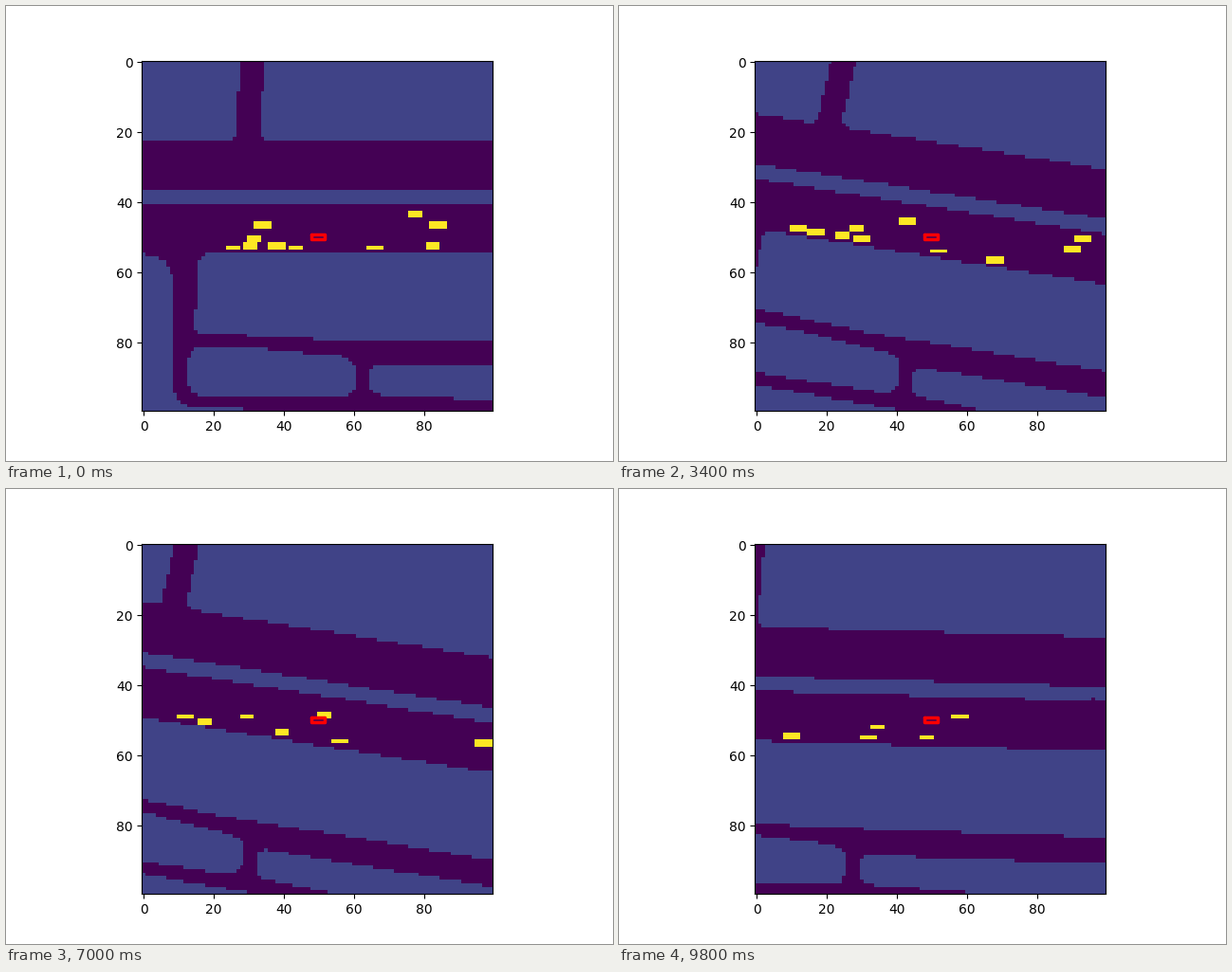
Animation of 640 by 480 pixels, one loop 9900 ms. Source, as a matplotlib script:

```python
import numpy as np
import matplotlib.pyplot as plt
from matplotlib.animation import FuncAnimation
from matplotlib.path import Path

N = 100
MID = N // 2
STEPS = 50
ROAD, LAND, CAR = 0, 1, 5
FAR = 140

# Main road edges and its median strip, as heights relative to the start
ROAD_TOP, MEDIAN_TOP, MEDIAN_LOW, ROAD_LOW = -27.5, -13.4, -9.2, 4.95

HALF_L, HALF_W = 1.8, .3
REAR_LIMIT = -41.7

# Start x, speed, acceleration, lane y
CARS = [
    # parked along the kerb
    (-24.5, 0, 0, 3.1), (-19.5, 0, 0, 2.79), (-11.8, 0, 0, 2.79),
    (-6.4, 0, 0, 3.15), (16, 0, 0, 3.15), (32.4, 0, 0, 2.79),
    # driving
    (27.5, 1.78, -.005, -6.8),
    (34, 1.16, -.0014, -3.3),
    (-16, 1.36, -.0037, -3.75),
    (-18.5, .52, .0047, .2),
]


def rounded(corners, r):
    """Closed path whose corners are replaced by quadratic curves."""
    p = np.array(corners, float)
    t = np.linspace(0, 1, 7)[:, None]
    out = []
    for prev, c, nxt in zip(np.roll(p, 1, 0), p, np.roll(p, -1, 0)):
        a, b = (c + (q - c) * min(.5, r / np.hypot(*(q - c)))
                for q in (prev, nxt))
        out.append((1 - t)**2 * a + 2 * t * (1 - t) * c + t**2 * b)
    return Path(np.vstack(out))


# Land between the streets; everything else is road
BLOCKS = [
    rounded([(-FAR, -90), (-20, -90), (-23.9, ROAD_TOP), (-FAR, ROAD_TOP)], 2),
    rounded([(-13, -90), (FAR, -90), (FAR, ROAD_TOP), (-16.9, ROAD_TOP)], 3.5),
    rounded([(-FAR, MEDIAN_TOP), (FAR, MEDIAN_TOP), (FAR, MEDIAN_LOW - .8),
             (79, MEDIAN_LOW - .6), (77, MEDIAN_LOW), (-FAR, MEDIAN_LOW)], 0),
    rounded([(-33.9, ROAD_LOW), (FAR, ROAD_LOW), (FAR, 29.8), (0, 29.1),
             (-35.5, 27.2)], 2),
    rounded([(-37.2, 31.4), (-20, 31.5), (10.5, 34.4), (10.5, 45.4),
             (-37.2, 45.4)], 4.5),
    rounded([(14.5, 36.6), (FAR, 37.4), (FAR, 50), (60, 47), (14.5, 44.9)], 3),
    rounded([(-FAR, ROAD_LOW), (-41.8, ROAD_LOW), (-41.8, 48.7), (FAR, 51.4),
             (FAR, FAR), (-FAR, FAR)], 8),
]


def ease(k, start, end):
    t = np.clip((k - start) / (end - start), 0, 1)
    return t * t * (3 - 2 * t)


def ego_pose(k):
    """Position and heading while slowing down and drifting one lane over."""
    x = .85 * k - .0033 * k * k
    y = -2.4 * ease(k, 5, 42)
    turn = .187 * np.sin(np.pi / 2 * min(k / 27, 1))
    return x, y, turn - .157 * ease(k, 30, 48)


def cells(center, half):
    lo, hi = (int(np.floor(MID + center + d + .5)) for d in (-half, half))
    return slice(max(lo, 0), max(hi + 1, 0))


COLS, ROWS = np.meshgrid(np.arange(N) - MID, np.arange(N) - MID)


def scene(k):
    ex, ey, a = ego_pose(k)
    c, s = np.cos(a), np.sin(a)
    pts = np.column_stack([(COLS * c + ROWS * s + ex).ravel(),
                           (ROWS * c - COLS * s + ey).ravel()])
    land = np.any([b.contains_points(pts) for b in BLOCKS], axis=0)
    grid = np.where(land, LAND, ROAD).reshape(N, N)

    for x0, speed, acc, y in CARS:
        dx, dy = x0 + speed * k + acc * k * k - ex, y - ey
        u, v = dx * c - dy * s, dx * s + dy * c
        if u > REAR_LIMIT:
            grid[cells(v, HALF_W), cells(u, HALF_L)] = CAR
    return grid


scenes = [scene(k) for k in range(STEPS)]

fig, ax = plt.subplots(figsize=(6.4, 4.8), dpi=100)
image = ax.imshow(scenes[0], cmap="viridis", vmin=ROAD, vmax=CAR,
                  interpolation="nearest")
left, right, top, low = 48, 51.7, 49.2, 50.55
ax.plot([left, right, right, left, left], [top, top, low, low, top],
        color="red", lw=2.5, solid_capstyle="round", solid_joinstyle="round",
        scalex=False, scaley=False)


def update(i):
    image.set_data(scenes[i // 2])
    return image,


# Each scene holds two ticks, the last one a single tick
anim = FuncAnimation(fig, update, frames=2 * STEPS - 1, interval=100,
                     repeat=True, repeat_delay=0)
plt.show()
```
